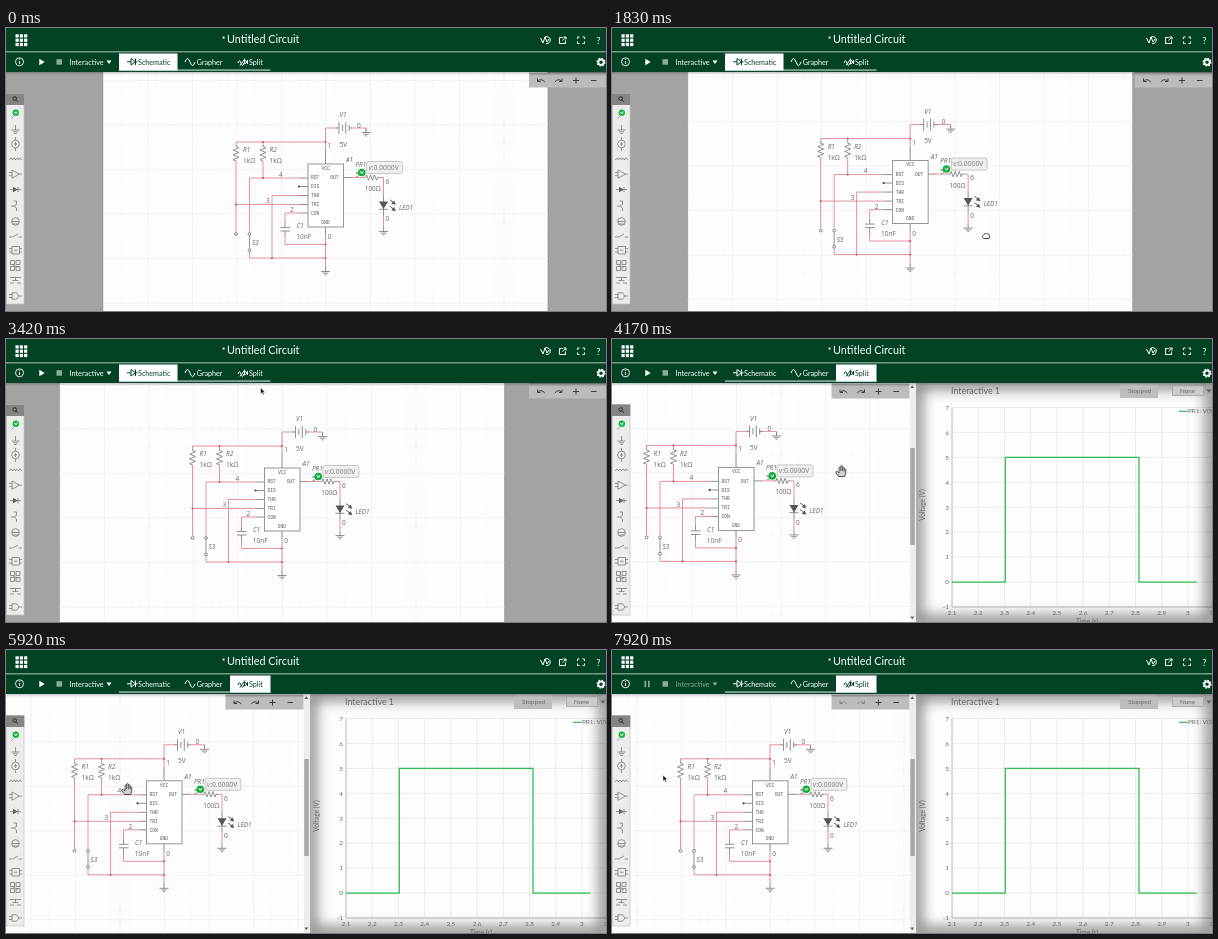
These frames come from a looping animation (600x283 px, 8 s). An HTML page:

```html
<!DOCTYPE html>
<html lang="en">
<head>
<meta charset="utf-8">
<title>Circuit editor</title>
<style>
  html, body { margin: 0; width: 100%; height: 100%; overflow: hidden; background: #a3a3a3; }
  svg { display: block; width: 100%; height: 100%; }
  text { font-family: Lato, "Open Sans", sans-serif; white-space: pre; }
  #sheet text { font-family: "Open Sans", sans-serif; }
  #sheet .mono { font-family: "Liberation Mono", monospace; }
  .line { fill: none; stroke: #777; stroke-width: .8; }
  .wire { fill: none; stroke: #e0808d; stroke-width: .85; }
  .icon { fill: none; stroke: #7c7c7c; stroke-width: .8; }
  .white { fill: none; stroke: #fff; stroke-width: 1; }
  .dark { fill: none; stroke: #3c3c3c; stroke-width: 1; }
</style>
</head>
<body>
<svg id="stage" viewBox="0 0 600 283" preserveAspectRatio="none"></svg>
<script>
const text = (x, y, s, size = 6.5, fill = '#666', more = '') =>
  `<text x="${x}" y="${y}" font-size="${size}" fill="${fill}" ${more}>${s}</text>`;
const path = (cls, d, more = '') => `<path class="${cls}" d="${d}" ${more}/>`;
const rect = (x, y, w, h, fill, more = '') =>
  `<rect x="${x}" y="${y}" width="${w}" height="${h}" fill="${fill}" ${more}/>`;
const dot = (x, y, r, fill, more = '') => `<circle cx="${x}" cy="${y}" r="${r}" fill="${fill}" ${more}/>`;
const mid = 'text-anchor="middle"', end = 'text-anchor="end"', slant = 'font-style="italic"';
const ground = (x, y) => path('line', `M${x} ${y - 4}v4m-4.5 0h9m-7.3 1.7h5.6m-3.8 1.7h2`);
const range = (n, f) => Array.from({ length: n }, (_, i) => f(i)).join('');

const defs = `<defs>
  <pattern id="fine" x="97" y="7.5" width="8.9" height="8.9" patternUnits="userSpaceOnUse">
    <path d="M0 0H8.9M0 0V8.9" fill="none" stroke="#f5f4f6" stroke-width=".8"/></pattern>
  <pattern id="coarse" x="97" y="7.5" width="44.5" height="44.5" patternUnits="userSpaceOnUse">
    <path d="M0 0H44.5M0 0V44.5" fill="none" stroke="#ebeaed" stroke-width="1"/></pattern>
  <linearGradient id="shade" x2="0" y2="1"><stop stop-color="#000" stop-opacity=".22"/>
    <stop offset="1" stop-color="#000" stop-opacity="0"/></linearGradient>
  <filter id="soft"><feGaussianBlur stdDeviation="7"/></filter>
  <clipPath id="pane"><rect id="paneBox" y="44" width="600" height="239"/></clipPath>
  <clipPath id="plotBox"><rect x="304" y="44" width="296" height="239"/></clipPath>
</defs>`;

function circuit() {
  const zigDown = 'l3 1.2-6 2.4 6 2.4-6 2.4 6 2.4-6 2.4 3 1.2';
  const wires = path('wire', `M319.5 122V100H331M345 100H360V103M230 118V114H319.5M257 114V118
    M230 133V204M257 133V150M243.5 204V150H294M230 176.5H294M266 230V167.5H294M294 185H279V194
    M279 208V216.5H319.5M243.5 224V230H319.5M319.5 207V240M345 149.5H358M373 149.5H377.5V167M377.5 188V200`);
  const parts = path('line', `M319.5 122V136M319.5 199V207M230 117.5v1${zigDown}M257 117.5v1${zigDown}
    M330 100h3M333 94v12M336.4 97v6M339.8 94v12M343.2 97v6M343.2 100h3
    M294 150h8M293 158.5h9M294 167.5h8M294 176.5h8M294 185h8M337.5 149.5h8
    M279 194v5.5M274.5 199.5h9.5M274.5 203h9.5M279 203v5.5M243.5 207.5v13
    M358 149.5h1.5l1-2.7 2 5.4 2-5.4 2 5.4 2-5.4 2 5.4 1-2.7h2
    M377.5 167V188M373 181.3h9`);
  const arrowOut = y => `M383.5 ${y}l3 2.2-1.2 1.6 4.5 1-1.6-4.2-1 1.2-3.1-2.4z`;
  const led = path('', `M373 173.5h9l-4.5 7.5z${arrowOut(172)}${arrowOut(178.5)}`, 'fill="#555"');
  const nodes = [[257, 114], [319.5, 114], [257, 150], [230, 176.5], [266, 230], [319.5, 216.5], [319.5, 230]]
    .map(([x, y]) => dot(x, y, 1.1, '#d4586a')).join('');
  const ends = [[230, 206], [243.5, 206], [243.5, 222.3]]
    .map(([x, y]) => dot(x, y, 1.4, '#fff', 'stroke="#666" stroke-width=".8"')).join('');
  const chip = rect(302, 136, 35.5, 63, '#fff', 'stroke="#8a8a8a" stroke-width=".9"') +
    ['RST', 'DIS', 'THR', 'TRI', 'CON'].map((s, i) =>
      text(305, 151.2 + i * 8.95, s, 4.6, '#555', 'class="mono"')).join('') +
    [['OUT', 328.5, 151.2], ['VCC', 319.7, 141.8], ['GND', 319.5, 195.6]].map(([s, x, y]) =>
      text(x, y, s, 4.6, '#555', `class="mono" ${mid}`)).join('');
  const names = [['V1', 333.5, 89.3], ['R1', 237, 124.2], ['R2', 263.5, 124.2], ['A1', 340, 134], ['C1', 290.5, 200.3],
    ['S3', 246, 217.3], ['LED1', 393, 181.8], ['PR1', 349.5, 138.8]]
    .map(([s, x, y]) => text(x, y, s, 6.4, '#666', slant)).join('');
  const values = [['5V', 333.5, 118.7], ['1kΩ', 237, 135.2], ['1kΩ', 263.5, 135.2], ['10nF', 290.3, 211.3], ['100Ω', 358.7, 163],
    ['1', 321.7, 120], ['0', 351, 99.5], ['4', 273, 148.5], ['3', 260, 175.4], ['2', 284, 184], ['0', 321.7, 211],
    ['5', 349.5, 149], ['6', 379.5, 155.8], ['0', 379.5, 193.3]]
    .map(([s, x, y]) => text(x, y, s)).join('');
  const probe = rect(360.5, 133.5, 36, 12, '#efefef', 'rx="2" stroke="#bdbdbd" stroke-width=".8"') +
    text(362.5, 141.8, '<tspan font-style="italic">v</tspan>:0.0000V', 6.8, '#777') +
    dot(355.8, 144.5, 3.8, '#12ad3a') + path('white', 'M354.3 143.3l1.5 2.4 1.6-2.6', 'stroke-width=".9"');
  return rect(97, -160, 445, 600, '#fefdfe', 'stroke="#8d8d8d" stroke-width=".8"') +
    rect(97, -160, 445, 600, 'url(#fine)') + rect(97, -160, 445, 600, 'url(#coarse)') +
    wires + parts + led + nodes + ends + chip + dot(293, 158.5, 1.1, '#444') +
    ground(360, 104.5) + ground(319.5, 243.5) + ground(377.5, 203.5) + names + values + probe;
}

function palette() {
  const icons = `M9.5 97v5M5.5 102h8M7 103.8h5M8.3 105.5h2.4
    M9.5 109v3M9.5 120v3M5.7 116a3.8 3.8 0 0 1 7.6 0a3.8 3.8 0 0 1-7.6 0M9.5 114v4M8 116h3
    M3.5 132q1.5-4 3 0q1.5-4 3 0q1.5-4 3 0q1.5-4 3 0
    M3 144.5h3M3 147.7h3M6 142v8.2l7.5-4.1zM13.5 146.1h2.5
    M4 161.6h11M12 159v5.2
    M7.5 173h3v3.5l-2.5 1.500 2.500 2v3M5 178h3
    M5.700 193.500a3.800 3.800 0 1 1 7.600 0a3.800 3.800 0 0 1-7.600 0M5.700 193.500h7.600M6.500 196h6
    M3 209h3.500l5.500-3M12.500 209h3.500
    M6 218.500h7.500v7.500h-7.500zM3 220.500h3M3 224h3M13.500 220.500h2.500M13.500 224h2.500M8 222.200h3.500
    M4.500 232.500h4v4h-4zM10 232.500h4v4h-4zM4.500 238.500h4v4h-4zM10 238.500h4v4h-4zM6.500 236.500l5.500 3
    M4 249.500h11M9.500 249.500v3M6.500 252.500h6M4 255h4M11 255h4
    M3 266.500h3M3 269.500h3M6 264.800h4.500l2.500 3.200-2.500 3.200h-4.500zM13 268h3`;
  return rect(.5, 65.5, 17.5, 210.5, '#ececec', 'stroke="#c4c4c4" stroke-width=".7"') +
    rect(0, 65.5, 18.3, 11.5, '#858585') + dot(8.7, 70.5, 1.8, 'none', 'stroke="#222" stroke-width=".9"') +
    path('dark', 'M10 72l2 2') + dot(9.8, 84.8, 3.2, '#16b83c') +
    path('white', 'M8.5 83.8l1.3 2 1.5-2.2', 'stroke-width=".8"') +
    path('icon', 'M7.5 88.3l-2 2.3') + path('', 'M7 159v5.2l5-2.6z', 'fill="#555"') + path('icon', icons);
}

const toolbar = rect(523, 45, 78, 14.5, '#bcbcbc') + rect(523, 44, 78, 4, 'url(#shade)') +
  `<g id="history">${path('dark', 'M531.5 50.5v3h3M532 53.2q3-3.4 6.8.8M556 50.5v3h-3M555.5 53.2q-3-3.4-6.8.8')}</g>` +
  path('dark', 'M567 52.5h6M570 49.5v6M585 52.5h5.5');

function grapher() {
  const px = v => 340 + (v - 2.1) * 262.2, py = v => 243 - v * 24.93;
  const ys = [-1, 0, 1, 2, 3, 4, 5, 6, 7];
  const grid = ys.map(v => `M340 ${py(v)}H600`).join('') + range(10, i => `M${px(2.1 + i / 10)} 68.5V268`);
  const vignette = rect(304, 44, 296, 239, 'none', 'stroke="#000" stroke-opacity=".5" stroke-width="12" filter="url(#soft)"');
  return rect(304, 44, 296, 239, '#fdfdfd') +
    path('', grid, 'fill="none" stroke="#e8e8e8" stroke-width=".8"') +
    path('', 'M340 68.5V268H600', 'fill="none" stroke="#b5b5b5" stroke-width=".8"') +
    `<g clip-path="url(#plotBox)">${vignette}</g>` +
    text(339, 55.3, 'Interactive 1', 8.9, '#666') +
    rect(508, 45, 38, 14, '#bdbdbd') + text(516, 54.3, 'Stopped', 6.3, '#666') +
    rect(560.5, 47, 31, 9.5, '#cbcbcb', 'stroke="#a0a0a0" stroke-width=".7"') + text(568, 54.2, 'None', 6.3, '#666') +
    path('', 'M594.5 50.5h5l-2.5 3.3z', 'fill="#666"') +
    ys.map(v => text(337, py(v) + 2.3, v, 6.4, '#666', end)).join('') +
    range(11, i => text(px(2.1 + i / 10), 276.3, +(2.1 + i / 10).toFixed(1), 6.4, '#666', mid)) +
    text(475, 285, 'Time (s)', 6.6, '#666', mid) +
    text(0, 0, 'Voltage (V)', 6.6, '#666', `${mid} transform="translate(313.3 166)rotate(-90)"`) +
    path('', `M340 ${py(0)}H393.3V${py(5)}H527V${py(0)}H584.5`, 'fill="none" stroke="#2dbd50" stroke-width="1.25"') +
    path('', 'M567 72.3h8.5', 'stroke="#2dbd50" stroke-width="1.2"') + text(576, 73.9, 'PR1: V(5)', 6.4, '#666') +
    rect(298, 44, 6, 239, '#ededed') + rect(298.3, 109, 4.5, 97, '#a8a8a8') +
    path('', 'M298.3 49h4l-2-2.8zM298.3 277.5h4l-2 2.8z', 'fill="#666"');
}

function tab(id, x, w, label, tx, icon) {
  return `<g id="${id}">${rect(x, 25.5, w, 17, '#fff', 'class="tab"')}
    <path d="${icon}" fill="none" stroke="currentColor"/>${text(tx, 36.8, label, 7.2, 'currentColor')}</g>`;
}

function header() {
  return rect(0, 0, 600, 44, '#034325') + rect(0, 23.4, 600, .9, '#c3d3ca') +
    range(9, i => rect(9.5 + i % 3 * 4.3, 6.3 + Math.floor(i / 3) * 4.3, 3.2, 3.2, '#fff')) +
    text(215.5, 15.3, '*', 10, '#fff') + text(221, 15.3, 'Untitled Circuit', 10.8, '#fff') +
    path('white', `M534.5 10l2.5 5 2-6 2 5 2-3M538 10a3.5 3.5 0 1 1 2 5.5
      M557 9.5h-3.5v6h6v-3M556.5 12.5l3.5-3.5M557.5 9h2.5v2.5
      M573.5 9h-2v2M576.5 9h2v2M573.5 15.5h-2v-2M576.5 15.5h2v-2`) +
    text(592.3, 15.8, '?', 9.5, '#fff', mid) +
    dot(13.5, 33.8, 4, 'none', 'stroke="#fff" stroke-width=".9"') + path('white', 'M13.5 33v3M13.5 31v1') +
    path('', 'M33.3 30.7v6.6l5.4-3.3z', 'id="play" fill="#fff"') +
    path('', 'M32.5 30.8h1.7v6.5h-1.7zM36 30.8h1.7v6.5h-1.7z', 'id="pause" fill="#8aa698"') +
    rect(50.5, 31.2, 5.5, 5.5, '#8fa99b') +
    `<g id="mode" fill="#fff">${text(63.5, 36.7, 'Interactive', 7.3, 'inherit')}<path d="M100.5 32.5h5l-2.5 3.5z"/></g>` +
    rect(113, 41.6, 151.5, .9, '#fff') +
    tab('schematic', 113, 58.5, 'Schematic', 132, 'M121 33.8h4M125 30.5v6.6l4.5-3.3zM129.5 30.5v6.6M129.5 33.8h2') +
    tab('graph', 174, 48, 'Grapher', 190.7, 'M179 34q2.5-7 5 0t5 0') +
    tab('split', 224, 40.5, 'Split', 243, 'M232 35q1.5-4.500 3 0t3 0M234 37.500l5-7M238.500 32v4l2.800-2zM241.500 32v4') +
    dot(595, 34.2, 2.7, 'none', 'stroke="#fff" stroke-width="1.8"') +
    dot(595, 34.2, 3.9, 'none', 'stroke="#fff" stroke-width="1.3" stroke-dasharray="1.53"');
}

const cursors = `<g id="cursor">
  <path id="open" d="M-2.5 5.5L-5.2 1.5q-.3-1.5 1.5-1L-2 2V-3.500q.8-1.500 1.700 0V-5q.9-1.400 1.700 0v1.500q.9-1.200 1.700 0v1.500q1-1 1.700.3V2L3.700 5.500z
    M-.3-3.500V0M1.400-3.500V0M3.100-2V.500" fill="#d0d0d0" stroke="#444" stroke-width=".9"/>
  <path id="fist" d="M-3.500 1.500q-.5-1.700.8-2.200q.5-1.500 1.800-1.300q1.200-.7 2.200 0q1.800-.1 1.900 1.600q.8 1.500-.4 3.100h-5z"
    fill="#fff" stroke="#333" stroke-width=".9"/>
  <path id="arrow" d="M0 0V6.200L1.500 4.900 2.500 7.200 3.600 6.700 2.600 4.500H4.500z" fill="#111" stroke="#fff" stroke-width=".5"/>
</g>`;

document.getElementById('stage').innerHTML = defs +
  `<g clip-path="url(#pane)">${rect(0, 44, 600, 239, '#a3a3a3')}<g id="sheet">${circuit()}</g>
    ${palette()}</g><g id="plot">${grapher()}</g><g id="tools">${toolbar}</g>` +
  rect(0, 44, 600, 3, 'url(#shade)') + header() + cursors;

const el = id => document.getElementById(id);
const show = (id, on) => el(id).style.display = on ? '' : 'none';
const LOOP = 8000, SPLIT = 3700, RUN = 7830;

// Rows are [time, x, y]; equal times make a jump.
const sheetPath = [[1350, 0, 0], [2330, -43.5, -7], [SPLIT, -43.5, -7], [SPLIT, -195.5, -7.6],
  [4400, -195.5, -7.6], [5080, -165.2, -5.8], [5300, -161.5, -5.2]];
const cursorPath = [[80, 606, 120], [850, 415, 217], [1170, 415, 217], [1350, 395.5, 211], [2330, 352, 204.5],
  [2750, 352, 204.5], [3480, 246, 35], [3760, 246, 35], [4170, 229, 132], [4400, 234.7, 144.2],
  [5080, 265, 146], [5300, 268.7, 146.6], [5920, 121, 139], [6170, 121, 139], [6900, 35, 34],
  [7200, 35, 34], [7750, 50, 130], [7920, 51, 125]];

function along(rows, t) {
  const i = rows.findIndex(r => t < r[0]);
  if (i === 0) return rows[0].slice(1);
  if (i < 0) return rows[rows.length - 1].slice(1);
  const [t0, x0, y0] = rows[i - 1], [t1, x1, y1] = rows[i], k = (t - t0) / (t1 - t0);
  return [x0 + (x1 - x0) * k, y0 + (y1 - y0) * k];
}

function draw(t) {
  const split = t >= SPLIT, running = t >= RUN;
  const [cx, cy] = along(cursorPath, t);
  const drag = t >= 1350 && t < 2600 || t >= 4400 && t < 5330;
  const overSheet = cy > 60 && t < 6300;
  el('sheet').setAttribute('transform', `translate(${along(sheetPath, t)})`);
  el('cursor').setAttribute('transform', `translate(${cx} ${cy})`);
  el('tools').setAttribute('transform', `translate(${split ? -303.5 : 0})`);
  el('paneBox').setAttribute('width', split ? 298 : 600);
  show('plot', split);
  show('play', !running);
  show('pause', running);
  show('fist', drag);
  show('open', !drag && overSheet);
  show('arrow', !drag && !overSheet);
  el('mode').setAttribute('fill', running ? '#8aa698' : '#fff');
  el('history').style.opacity = running ? .4 : 1;
  for (const id of ['schematic', 'graph', 'split']) {
    const on = id === (split ? 'split' : 'schematic');
    el(id).style.color = on ? '#034325' : '#fff';
    el(id).querySelector('.tab').style.display = on ? '' : 'none';
  }
}

const start = performance.now();
function tick() {
  draw((performance.now() - start) % LOOP);
  requestAnimationFrame(tick);
}
draw(0);
requestAnimationFrame(tick);
</script>
</body>
</html>
```
